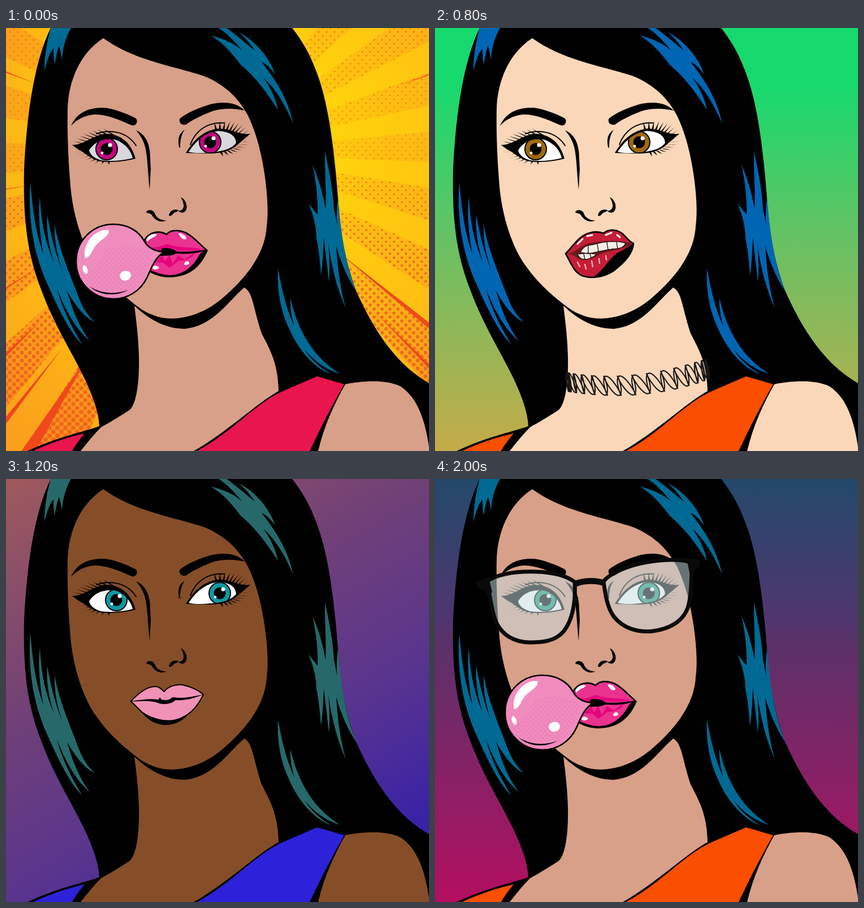
Recreate the animation shown at these times as an HTML page. Size 748x748 px, loop 2.4 s.

```html
<!DOCTYPE html>
<html lang="en">
<head>
<meta charset="utf-8">
<title>Pop art portrait</title>
<style>
  html, body { margin: 0; width: 100%; height: 100%; overflow: hidden; background: #000; }
  svg { display: block; width: 100%; height: 100%; }
  .skin { fill: var(--skin); }
  .dress { fill: var(--dress); }
  .shine { fill: var(--shine); }
  .line { fill: none; stroke: #000; stroke-linecap: round; stroke-linejoin: round; }
  .outlined { stroke: #000; stroke-width: 2.6; stroke-linejoin: round; }
  .white { fill: #fff; }
  .part { display: none; }
</style>
</head>
<body>
<svg viewBox="0 0 748 748">
  <defs>
    <radialGradient id="sun" gradientUnits="userSpaceOnUse" cx="460" cy="200" r="680">
      <stop offset=".15" stop-color="#ffcb0c"/><stop offset=".5" stop-color="#fdb216"/><stop offset="1" stop-color="#f98a1e"/>
    </radialGradient>
    <radialGradient id="beam" gradientUnits="userSpaceOnUse" cx="460" cy="200" r="680">
      <stop offset=".2" stop-color="#ffd20c"/><stop offset=".55" stop-color="#ffc012"/><stop offset="1" stop-color="#fba01b"/>
    </radialGradient>
    <linearGradient id="dusk" x2="0" y2="1">
      <stop stop-color="#23496a"/><stop offset=".33" stop-color="#50366f"/><stop offset=".37" stop-color="#58326a"/>
      <stop offset=".65" stop-color="#802467"/><stop offset="1" stop-color="#b40f60"/>
    </linearGradient>
    <linearGradient id="meadow" x2="0" y2="1">
      <stop offset=".13" stop-color="#16da6e"/><stop offset=".5" stop-color="#67c163"/><stop offset="1" stop-color="#c5ab4a"/>
    </linearGradient>
    <linearGradient id="violet" gradientUnits="userSpaceOnUse" x1="0" y1="0" x2="450" y2="765">
      <stop stop-color="#a05a5c"/><stop offset=".42" stop-color="#704077"/><stop offset=".72" stop-color="#5a358e"/><stop offset="1" stop-color="#3a22a6"/>
    </linearGradient>
    <pattern id="halftone" width="6" height="6" patternUnits="userSpaceOnUse" patternTransform="rotate(45)">
      <circle cx="3" cy="3" r="1.6" fill="#e57cb4"/>
    </pattern>
    <clipPath id="leftEye"><path id="leftWhite" d="M147 216C157 199 178 194 195 198C212 205 221 217 224 230C205 235 185 236 168 234C155 230 148 223 147 216Z"/></clipPath>
    <clipPath id="rightEye"><path id="rightWhite" d="M323 219C335 201 350 186 375 182C395 183 406 190 407 203C400 214 380 219 360 220C345 222 330 221 323 219Z"/></clipPath>
  </defs>

  <rect id="backdrop" width="748" height="748"/>
  <g id="burst" class="part"></g>

  <!-- hair, body, face -->
  <path d="M79 0C50 60 37 150 32 250C30 340 38 400 62 462C85 525 115 570 140 622C155 655 164 680 165 704C150 711 95 721 38 748H748V628C690 595 650 535 618 462C600 410 592 370 587 300C580 210 570 130 548 75C537 45 522 20 506 0Z"/>
  <path class="skin" d="M172 18C130 45 110 95 109 145C108 190 111 250 115 290C121 340 138 390 160 420C178 446 202 469 228 489C255 511 282 516 305 513C345 508 372 489 398 464C436 428 459 390 461 350C465 320 461 280 455 245C449 210 440 180 428 155C412 125 390 103 355 87C310 70 230 60 172 18Z"/>
  <path class="skin" d="M227 491C255 518 285 532 316 532C365 527 390 487 421 459C437 466 438 500 452 540C465 566 481 590 482 642C440 666 390 715 332 748H132C144 733 155 719 168 706C190 694 205 684 218 676C232 665 236 620 235 580C234 545 230 515 227 491Z"/>
  <path class="skin" d="M552 748C562 705 580 665 600 630C630 624 672 621 698 634C730 655 742 700 748 741V748Z"/>
  <path class="dress" d="M338 748C400 715 440 664 490 642L550 616L598 630C575 670 555 710 537 748ZM48 748C80 733 115 722 139 717C130 728 122 738 117 748Z"/>

  <g class="shine">
    <path d="M79 0C72 25 68 50 68 76C72 60 76 45 84 36C84 45 84 55 86 64C89 50 90 40 94 32C96 40 98 48 99 57C100 35 106 15 115 0Z"/>
    <path d="M362 13C388 20 405 28 418 40C405 25 390 8 376 0H390C410 14 425 28 440 40C430 25 420 14 411 7C440 22 465 50 476 82C468 72 462 64 452 60C475 90 497 120 508 169C495 140 480 110 455 88C468 105 477 125 481 145C462 115 440 85 415 65C400 45 385 27 362 13Z"/>
    <path d="M43 272C47 320 52 360 66 400C60 365 56 330 60 299C62 340 68 375 85 415C75 385 71 355 73 331C80 370 88 400 100 430C90 400 85 375 86 347C93 390 115 440 130 480C138 500 148 512 157 520C140 512 125 495 108 465C118 500 130 530 148 553C125 535 105 500 90 460C100 500 120 535 135 560C110 535 90 490 72 450C50 400 38 340 43 272Z"/>
    <path d="M564 218C572 255 578 285 580 320L586 350C584 335 585 315 587 300C592 360 600 420 620 466C605 445 590 410 584 385C586 425 592 465 601 496C585 460 575 420 570 380C572 405 573 430 571 449C568 420 564 390 562 370C561 395 560 418 557 437C555 410 553 390 549 372C549 350 543 330 535 310C541 318 547 325 551 330C552 300 548 270 542 242C552 265 560 290 565 320C567 285 563 250 564 218Z"/>
    <path d="M481 425C488 465 497 500 510 528C505 510 502 495 503 478C515 530 540 580 590 611C570 606 545 590 528 568C540 588 555 600 575 612C540 600 512 560 500 530C485 500 479 460 481 425Z"/>
  </g>

  <!-- brows, nose, eyes -->
  <path d="M115 173C125 150 145 140 175 141C195 144 215 152 230 160C234 166 230 174 222 172C195 160 175 152 155 153C138 155 125 162 115 173ZM307 161C312 155 335 142 365 134C390 129 410 133 422 146C405 142 385 141 365 147C345 155 330 162 318 171C308 172 306 166 307 161Z"/>
  <path d="M230 181C245 187 255 202 255 230L256 250L254 286C251 260 251 240 248 220C246 205 240 192 230 181ZM248 326C249 320 262 320 264 330C268 338 278 341 284 340C275 345 264 341 258 331C255 327 251 328 248 326ZM288 331C290 322 298 319 305 322C303 326 299 325 296 328C293 332 290 334 288 331ZM309 299C319 304 323 318 316 325C312 328 307 326 304 323C312 324 315 318 314 312C313 306 311 303 309 299Z"/>
  <path d="M306 211C303 195 306 186 316 180C309 190 308 200 308 212Z"/>
  <path class="line" stroke-width="2" d="M160 187C185 178 215 184 230 208M326 206C335 182 355 166 386 168"/>
  <path d="M117 207C140 206 150 191 175 187C205 187 222 205 229 231C205 237 185 238 168 236C150 233 140 220 128 215ZM318 221C332 197 350 181 375 178C398 177 412 190 432 187C422 196 413 203 409 207C398 217 380 222 360 222Z"/>
  <g id="lashes"></g>
  <g id="whites"><use href="#leftWhite"/><use href="#rightWhite"/></g>
  <g clip-path="url(#leftEye)"><g class="iris"></g></g>
  <g clip-path="url(#rightEye)"><g class="iris"></g></g>

  <g id="fullLips" class="part">
    <path d="M238 410C260 428 300 430 328 409C306 443 262 444 238 410Z"/>
    <path id="lipFill" class="outlined" style="stroke-width:2" d="M221 393C235 378 250 366 265 367C274 368 276 374 280 376C284 369 298 362 312 364C330 368 342 375 349 381C340 400 325 420 300 426C280 431 255 423 240 412C232 404 226 398 221 393Z"/>
    <path d="M221 393C240 390 255 388 270 390L272 386L275 390C283 392 290 391 294 386L297 386C315 389 332 384 349 381C330 389 315 392 300 391C290 400 275 399 266 395C250 391 236 394 221 393Z"/>
  </g>

  <g id="kiss" class="part">
    <path class="outlined" fill="#e30c15" d="M241 404C252 398 250 386 258 375C266 363 280 361 290 367C300 360 318 364 326 376C329 382 333 386 338 389C329 393 330 400 325 408C315 423 300 429 288 429C268 428 258 418 250 406Z"/>
    <path d="M262 418C280 428 300 427 320 413C305 436 276 436 262 418Z"/>
    <path fill="#a90710" d="M276 383C274 374 278 368 283 371L290 377L299 370C304 375 301 380 298 383L310 386L292 391L268 388ZM272 414C285 420 302 418 314 408C302 425 284 427 272 414Z"/>
    <path d="M246 403C258 394 266 390 276 389C278 384 284 381 291 386C297 380 301 383 304 387C315 387 326 388 335 389C320 391 310 392 301 392C297 399 293 402 289 396C283 402 278 400 275 394C265 394 256 399 246 403Z"/>
    <path class="white" d="M258 389C259 378 266 372 272 374C270 382 265 388 258 389ZM258 403C266 402 273 408 272 414C264 414 259 409 258 403ZM307 407C309 400 318 400 323 402C320 409 312 411 307 407ZM306 373C313 370 319 375 322 382C315 382 309 378 306 373Z"/>
  </g>

  <g id="bite" class="part">
    <path class="outlined" fill="#c41d35" d="M231 399C245 385 255 366 275 362C285 359 292 361 298 363C308 354 325 356 335 367C342 375 347 379 351 381C350 398 335 415 315 430C300 440 275 445 258 437C245 430 240 415 231 399Z"/>
    <path d="M351 381C350 402 333 419 312 431C300 439 289 441 279 441C302 426 311 400 330 394Z"/>
    <path fill="#6d1b1b" d="M231 399C248 399 258 383 275 380C300 376 325 375 351 381C333 391 312 393 292 400C280 407 266 414 254 408C248 404 240 399 231 399Z"/>
    <path fill="#f3eee6" stroke="#2a1010" stroke-width="1.3" d="M257 397C262 386 270 384 280 383C300 377 320 376 337 380C335 388 325 391 313 391C298 393 284 397 271 399ZM251 400L271 398L286 400C278 407 266 412 257 407Z"/>
    <path class="line" stroke-width="1.2" d="M271 386L271 398M287 382L289 395M304 379L306 392M321 379L323 390M263 400L265 409M274 399L276 406"/>
    <path class="line" style="stroke:#fff" stroke-width="3" d="M252 382L261 373M269 368L278 366M302 366L312 362M322 366L327 370"/>
    <path class="line" style="stroke:#f5a9b5" stroke-width="2.5" d="M252 414L256 422M265 418L267 426M277 412L279 422M290 408L291 416M302 403L303 410"/>
  </g>

  <g id="bubble" class="part">
    <path d="M340 381L357 393C345 421 326 440 290 441C275 441 260 436 252 430Z"/>
    <path class="outlined" fill="#ea338f" d="M245 375C253 361 270 357 284 365C292 356 305 357 318 362C333 370 343 383 354 392C342 398 341 408 333 417C318 434 300 440 285 438C270 437 262 432 254 429L252 393Z"/>
    <path fill="#e4057d" d="M246 384C262 393 275 384 286 382C305 390 330 386 347 392C325 396 300 392 281 392C268 397 256 394 246 384ZM262 415L276 402L281 412L289 402L295 417L304 402L316 409L333 397C334 405 320 411 305 412L289 424L278 415Z"/>
    <path d="M275 390C285 387 296 391 302 395C325 397 342 393 354 392C335 401 315 399 300 399C292 404 282 402 272 403Z"/>
    <path class="white" d="M248 374C252 365 261 363 267 365C265 370 255 371 250 378ZM305 363C313 362 319 368 319 373C313 376 308 370 305 363ZM315 418C316 411 324 411 324 416C321 420 318 420 315 418ZM258 424C262 418 268 420 271 424C267 428 262 428 258 424Z"/>
    <path id="gum" class="outlined" fill="#f08cbe" d="M244 376C251 390 264 395 280 396C264 405 258 422 250 440C238 466 214 479 190 479C153 479 124 449 124 413C124 376 153 347 190 347C214 347 234 358 244 376Z"/>
    <path fill="url(#halftone)" d="M176 392C205 380 235 383 256 399C250 440 225 473 190 475C160 475 137 458 130 438C150 440 165 415 176 392Z"/>
    <path class="white" d="M140 407C134 384 155 355 181 357C185 366 170 373 160 383C152 392 150 406 140 407Z"/>
    <ellipse class="white" cx="140" cy="427" rx="4" ry="8" transform="rotate(-18 140 427)"/>
    <ellipse class="white" cx="211" cy="438" rx="10" ry="8.5" transform="rotate(-15 211 438)"/>
    <path d="M148 457C170 471 195 471 217 463C195 475 166 474 148 457Z"/>
  </g>

  <g id="cigarette" class="part">
    <path fill="#c98d3c" d="M290 394L297 385L320 390L316 404L293 398Z"/>
    <path fill="#e7bd72" d="M297 385L320 390L319 395L296 390Z"/>
    <path fill="#efece6" d="M320 390L405 410L401 426L316 404Z"/>
    <path fill="#c9c4bd" d="M317 400L402 421L401 426L316 404Z"/>
    <ellipse cx="404" cy="418" rx="6.5" ry="8.5" fill="#877c78" transform="rotate(14 404 418)"/>
    <ellipse cx="406" cy="418" rx="4.5" ry="6" fill="#e58a7c"/>
  </g>

  <path id="choker" class="part line" stroke-width="2.1" style="stroke:#171717"/>

  <g id="glasses" class="part">
    <g fill="#c8dce1" fill-opacity=".52" stroke="#0a0a0a" stroke-width="7" stroke-linejoin="round">
      <path d="M91 181C115 166 150 163 180 164C208 165 232 171 247 182C249 215 244 249 227 270C212 287 190 289 167 289C138 288 119 276 108 253C99 232 98 205 91 181Z"/>
      <path d="M298 181C311 165 345 152 375 147C405 142 430 141 455 147C453 175 454 205 447 228C437 254 414 265 385 269C355 272 331 262 316 243C304 226 301 203 298 181Z"/>
    </g>
    <path fill="#0a0a0a" d="M72 186C72 179 82 179 95 174L101 200L94 208C89 196 82 195 75 194ZM425 139L466 142C470 146 469 153 466 156C458 158 457 170 453 182L447 150ZM244 181C260 174 285 173 300 179L301 190C285 184 262 184 247 192Z"/>
  </g>
</svg>

<script>
const $ = id => document.getElementById(id);
const TAU = Math.PI * 2, SCENE_MS = 400;
const sunset = { bg: 'url(#dusk)', skin: '#d8a088', shine: '#006a94', iris: '#189a78', gaze: 17 };
const scenes = [
  { ...sunset, bg: 'url(#sun)', dress: '#e9154f', iris: '#c0087e', white: '#d8d8dc', gaze: 0, parts: ['burst', 'bubble'] },
  { ...sunset, dress: '#5ba08c', parts: ['kiss', 'glasses'] },
  { bg: 'url(#meadow)', skin: '#fad7b9', shine: '#0066b3', dress: '#fa4e00', iris: '#a0680c', gaze: 0, parts: ['bite', 'choker'] },
  { bg: 'url(#violet)', skin: '#854e29', shine: '#27696b', dress: '#2d22d9', iris: '#0f98a3', gaze: 17, lips: '#f092b5', parts: ['fullLips'] },
  { bg: '#bdaac1', skin: '#ffb2d9', shine: '#00b14f', dress: '#5ba08c', iris: '#984a90', gaze: 0, lips: '#f0a48d', parts: ['fullLips', 'cigarette', 'glasses'] },
  { ...sunset, dress: '#fa4e00', parts: ['bubble', 'glasses'] }
];

const quad = (p, t) => [0, 1].map(k => (1 - t) ** 2 * p[k] + 2 * t * (1 - t) * p[k + 2] + t * t * p[k + 4]);

// Tapered lashes between a curve of roots and a curve of tips.
function lashes(roots, tips, count) {
  let d = '';
  for (let i = 0; i < count; i++) {
    const t = i / (count - 1), [x, y] = quad(roots, t), [tx, ty] = quad(tips, t);
    d += `M${x - 2} ${y}Q${(x + tx) / 2 - 1} ${(y + ty) / 2 + 1} ${tx} ${ty}L${x + 2} ${y}Z`;
  }
  return `<path d="${d}"/>`;
}

// Sun beam from the centre of the burst, angle and spread in degrees.
function beam(angle, spread, from, to, fill) {
  const at = (a, r) => `${370 + r * Math.cos(a * TAU / 360)} ${220 + r * Math.sin(a * TAU / 360)}`;
  return `<path fill="${fill}" d="M${at(angle, from)}L${at(angle - spread, to)}L${at(angle + spread, to)}Z"/>`;
}

function burst() {
  let dots = '', beams = '';
  for (let row = 0; row < 108; row++) {
    for (let x = row % 2 * 7; x < 750; x += 14) {
      const y = row * 7;
      const r = 1 + 3.2 * Math.max(0, (y - 200) / 548) + Math.max(0, 1 - y / 200) * .4;
      if (x < 170 || x > 505) dots += `M${x - r} ${y}a${r} ${r} 0 1 0 ${2 * r} 0a${r} ${r} 0 1 0 ${-2 * r} 0`;
    }
  }
  for (let a = -54; a < 306; a += 15) beams += beam(a, 3.4, 0, 900, 'url(#beam)');
  const streaks = [[39, .6, 270, 600], [122, 1.2, 420, 700], [128, .5, 440, 700], [-20, .25, 350, 460],
    [201, .3, 340, 470], [170, .3, 335, 480], [147, .35, 370, 560], [136, .5, 430, 600], [45, .4, 400, 600]];
  for (const s of streaks) beams += beam(...s, '#f0481c');
  return `<path fill="#ee5a1c" fill-opacity=".8" d="${dots}"/>${beams}`;
}

// Two mirrored looping strands around the neck.
function choker() {
  let d = '';
  for (const side of [-1, 1]) {
    for (let i = 0; i <= 600; i++) {
      const t = i / 600, turn = t * TAU * 15, u = (1 - Math.cos(t * Math.PI)) / 2;
      const x = 234 + 248 * u + 9 * Math.cos(turn) * Math.sin(.3 + t * 2.5);
      const y = 626 - 23 * u + 65 * u * (1 - u) + side * 17 * Math.sin(turn + side);
      d += `${i ? 'L' : 'M'}${x.toFixed(1)} ${y.toFixed(1)}`;
    }
  }
  return d;
}

$('burst').innerHTML = burst();
$('choker').setAttribute('d', choker());
$('lashes').innerHTML =
  lashes([138, 210, 150, 190, 190, 189], [116, 206, 130, 182, 172, 178], 9) +
  lashes([140, 217, 150, 235, 182, 235], [122, 220, 132, 241, 182, 242], 8) +
  lashes([372, 181, 402, 178, 412, 198], [368, 166, 415, 158, 434, 186], 10) +
  lashes([412, 202, 405, 218, 380, 219], [433, 200, 418, 222, 384, 227], 8);

const irises = [...document.querySelectorAll('.iris')];
const irisCentres = [[178, 214], [361, 202]];
irises.forEach((g, i) => {
  const [x, y] = irisCentres[i];
  g.innerHTML = `<circle cx="${x}" cy="${y}" r="19" fill="var(--iris)" stroke="#000" stroke-width="2"/>
    <circle cx="${x}" cy="${y}" r="10.5"/>
    <circle class="white" cx="${x + 6}" cy="${y - 7}" r="3.6"/><circle class="white" cx="${x - 8}" cy="${y + 7}" r="2.4"/>`;
});

const svg = document.querySelector('svg');
let shown = -1;
function show(index) {
  const s = scenes[index];
  for (const key of ['skin', 'dress', 'shine', 'iris']) svg.style.setProperty('--' + key, s[key]);
  $('backdrop').setAttribute('fill', s.bg);
  $('whites').setAttribute('fill', s.white || '#fff');
  $('lipFill').setAttribute('fill', s.lips || 'none');
  irises.forEach(g => g.setAttribute('transform', `translate(${s.gaze})`));
  document.querySelectorAll('.part').forEach(p => p.style.display = s.parts.includes(p.id) ? 'inline' : 'none');
}
function tick() {
  const index = Math.floor(performance.now() / SCENE_MS) % scenes.length;
  if (index !== shown) show(shown = index);
  requestAnimationFrame(tick);
}
tick();
</script>
</body>
</html>
```
